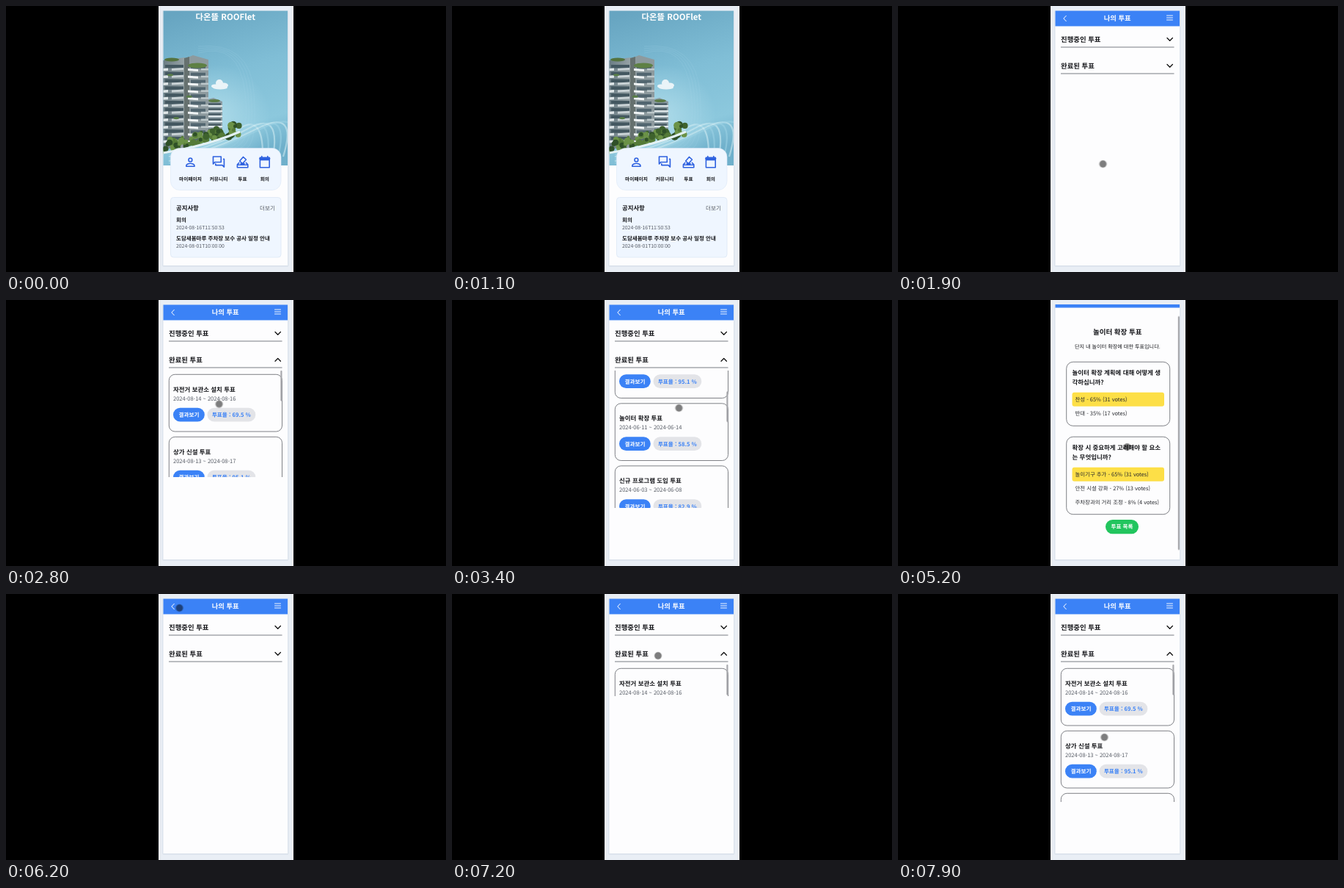
These frames come from a looping animation (600 by 362 pixels, 8 s). An HTML page:

```html
<!DOCTYPE html>
<html lang="ko">
<head>
<meta charset="utf-8">
<title>투표 앱</title>
<style>
html, body { margin: 0; width: 100%; height: 100%; overflow: hidden; background: #000; }
svg { display: block; width: 600px; height: 362px; }
text { font-family: "Noto Sans CJK KR", "Noto Sans", sans-serif; text-rendering: geometricPrecision; }
.line { fill: none; stroke-linecap: round; stroke-linejoin: round; }
.box { fill: #fdfdfe; stroke: #5f6168; stroke-width: .8; }
#home, #bar, #votes, #blank, #detail, #pane, #open, #shut, #pull, #cards, #thumb, #page, #pageThumb, #cursor {
  animation: 8s linear infinite;
}
#home { animation-name: home; }
#bar { animation-name: bar; }
#votes { animation-name: votes; }
#detail { animation-name: detail; }
#open { animation-name: open; }
#shut { animation-name: shut; }
#pull { animation-name: pull; transform-origin: 0 94px; }
#cards { animation-name: cards; }
#thumb { animation-name: thumb; }
#page { animation-name: page; }
#pageThumb { animation-name: pageThumb; }
#cursor { animation-name: cursor; }

@keyframes home {
  0%, 21.24% { visibility: visible; }
  21.25%, 100% { visibility: hidden; }
}
@keyframes bar {
  0%, 21.24% { visibility: hidden; }
  21.25%, 100% { visibility: visible; }
}
@keyframes votes {
  0%, 21.24% { opacity: 0; }
  21.25%, 53.74% { opacity: 1; }
  53.75%, 73.74% { opacity: 0; }
  73.75%, 100% { opacity: 1; }
}
@keyframes detail {
  0%, 56.87% { opacity: 0; }
  56.88%, 73.74% { opacity: 1; }
  73.75%, 100% { opacity: 0; }
}
@keyframes open {
  0%, 32.49% { opacity: 0; }
  32.5%, 60% { opacity: 1; }
  60.01%, 88.74% { opacity: 0; }
  88.75%, 100% { opacity: 1; }
}
@keyframes shut {
  0%, 32.49% { opacity: 1; }
  32.5%, 60% { opacity: 0; }
  60.01%, 88.74% { opacity: 1; }
  88.75%, 100% { opacity: 0; }
}
@keyframes pull {
  0%, 32.5% { transform: scaleY(0); animation-timing-function: ease-in-out; }
  36.25%, 60% { transform: scaleY(1); }
  60.01%, 88.75% { transform: scaleY(0); animation-timing-function: ease-in-out; }
  92.5%, 100% { transform: scaleY(1); }
}
@keyframes cards {
  0%, 37.5% { transform: none; animation-timing-function: ease-out; }
  42%, 60% { transform: translateY(-130.5px); }
  60.01%, 100% { transform: none; }
}
@keyframes thumb {
  0%, 37.5% { transform: none; animation-timing-function: ease-out; }
  42%, 60% { transform: translateY(28.5px); }
  60.01%, 100% { transform: none; }
}
@keyframes page {
  0%, 59% { transform: none; animation-timing-function: ease-out; }
  64%, 68.5% { transform: translateY(-17px); }
  70.5%, 100% { transform: none; }
}
@keyframes pageThumb {
  0%, 59% { transform: none; animation-timing-function: ease-out; }
  64%, 68.5% { transform: translateY(15.6px); }
  70.5%, 100% { transform: none; }
}
@keyframes cursor {
  0%, 16.24% { transform: translate(322px, 214px); opacity: 0; }
  16.25%, 21.25% { transform: translate(322px, 214px); opacity: 1; }
  23.75% { transform: translate(279.5px, 215px); }
  26% { transform: translate(279.5px, 212px); }
  31.25%, 33.75% { transform: translate(281px, 84px); }
  37.5% { transform: translate(309.5px, 255px); animation-timing-function: ease-out; }
  42%, 43.5% { transform: translate(309.5px, 147px); }
  47.5%, 55% { transform: translate(249px, 195px); }
  59% { transform: translate(312.5px, 217px); animation-timing-function: ease-out; }
  64%, 68.5% { transform: translate(312.5px, 200px); }
  72.5%, 74% { transform: translate(228px, 17px); }
  77%, 79% { transform: translate(236.5px, 19px); }
  87%, 90.5% { transform: translate(281px, 84px); }
  98%, 99.99% { transform: translate(281.5px, 195px); opacity: 1; }
  100% { transform: translate(281.5px, 195px); opacity: 0; }
}
</style>
</head>
<body>
<svg viewBox="0 0 600 362" xmlns="http://www.w3.org/2000/svg">
  <defs>
    <linearGradient id="sky" x1=".2" y1="0" x2=".45" y2="1">
      <stop offset="0" stop-color="#67a5c1"/>
      <stop offset=".45" stop-color="#80bed6"/>
      <stop offset=".8" stop-color="#8cc8dd"/>
      <stop offset="1" stop-color="#6fb0cb"/>
    </linearGradient>
    <radialGradient id="glow">
      <stop offset="0" stop-color="#b9e2ee" stop-opacity=".75"/>
      <stop offset="1" stop-color="#b9e2ee" stop-opacity="0"/>
    </radialGradient>
    <linearGradient id="wall">
      <stop offset="0" stop-color="#697b83"/>
      <stop offset="1" stop-color="#98a4a7"/>
    </linearGradient>
    <clipPath id="screen"><rect x="214.5" y="6.5" width="169.5" height="346.5"/></clipPath>
    <clipPath id="photoClip"><rect x="214.5" y="6.5" width="169.5" height="210.5"/></clipPath>
    <clipPath id="pullClip"><rect id="pull" x="221" y="94" width="157" height="189"/></clipPath>
    <clipPath id="listClip"><rect x="221" y="96" width="157" height="187"/></clipPath>
  </defs>

  <rect width="600" height="362"/>
  <rect x="208" width="184" height="362" fill="#e9eef5"/>
  <rect x="213" y="6" width="172.5" height="349" rx="2" fill="#dde4ed"/>
  <rect x="214.5" y="6.5" width="169.5" height="346.5" fill="#fdfdfe"/>

  <g clip-path="url(#screen)">
    <g id="home">
      <g id="photo" clip-path="url(#photoClip)"></g>
      <rect x="224.5" y="193.5" width="150.5" height="57" rx="12" fill="#eff6ff" stroke="#dce8f7" stroke-width=".6"/>
      <rect x="224.5" y="260.5" width="150.5" height="81.5" rx="4" fill="#eff6ff" stroke="#dce8f5" stroke-width=".8"/>
      <g class="line" stroke="#2f62e0" stroke-width="2">
        <g transform="translate(241.8 203) scale(.8)">
          <circle cx="12" cy="8" r="3"/>
          <path d="M5 19v-1c0-2.6 4.5-4 7-4s7 1.4 7 4v1z"/>
        </g>
        <g transform="translate(280 202.5) scale(.83)">
          <path d="M3 3h13v9H6l-3 3zM20 7h1v13l-3-3H7v-2"/>
        </g>
        <g transform="translate(313 203) scale(.8)">
          <path d="M6 13l-3 3v5h18v-5l-3-3M3 16.5h18M7 10l6-7 5 4.500-6 7zM9 14.500h6"/>
        </g>
        <g transform="translate(343.2 203) scale(.8)">
          <path d="M4 4h16v17H4zM4 8h16M7 2v2M17 2v2"/>
          <path d="M4 6h16" stroke-width="3"/>
        </g>
      </g>
    </g>

    <g id="votes">
      <path d="M222 56H376.500M222 92H376.500" stroke="#6a6e78" stroke-width=".9"/>
      <g class="line" stroke="#111" stroke-width="1.300">
        <path d="M367 43.500l3.700 3.700 3.700-3.700"/>
        <path id="shut" d="M367 79.500l3.700 3.700 3.700-3.700"/>
        <path id="open" d="M367 83.200l3.700-3.700 3.700 3.700"/>
      </g>
      <g clip-path="url(#pullClip)">
        <g clip-path="url(#listClip)">
          <g id="cards"></g>
          <rect id="thumb" x="374.300" y="96" width="2.200" height="41.500" rx="1" fill="#a8a9ad"/>
        </g>
      </g>
    </g>

    <g id="page">
      <g id="bar">
        <rect x="214.500" y="6.500" width="169.500" height="21" fill="#3b82f6"/>
        <g class="line" stroke="#fff" stroke-width="1">
          <path d="M229.300 13.300l-3.500 3.700 3.500 3.700"/>
          <path d="M366.500 13h8M366.500 16h8M366.500 19h8" stroke-width=".9"/>
        </g>
      </g>
      <g id="detail"></g>
    </g>
    <g id="pageThumbWrap"></g>
  </g>

  <g id="cursor">
    <circle r="5.600" opacity=".15"/>
    <circle r="4.700" opacity=".42"/>
  </g>
</svg>

<script>
const $ = id => document.getElementById(id);

function add(parent, tag, attrs, content) {
  const el = document.createElementNS("http://www.w3.org/2000/svg", tag);
  for (const key in attrs) el.setAttribute(key, attrs[key]);
  if (content) el.textContent = content;
  parent.appendChild(el);
  return el;
}

// cy is the visual middle of the line of text.
function label(parent, content, x, cy, size, { weight = 700, fill = "#15161a", anchor = "start" } = {}) {
  return add(parent, "text", {
    x, y: cy + size * .37, "font-size": size, "font-weight": weight, fill, "text-anchor": anchor
  }, content);
}

const rect = (parent, x, y, width, height, fill, rx = 0) =>
  add(parent, "rect", { x, y, width, height, fill, rx });
const poly = (parent, points, fill) => add(parent, "polygon", { points, fill });

function drawPhoto() {
  const p = $("photo");
  let seed = 7;
  const rand = () => (seed = seed * 16807 % 2147483647) / 2147483647;

  rect(p, 214, 6, 171, 212, "url(#sky)");
  add(p, "ellipse", { cx: 285, cy: 150, rx: 75, ry: 70, fill: "url(#glow)" });
  for (let i = 0; i < 4; i++) {
    add(p, "path", {
      d: `M262 ${64 - i * 3}Q${318 + i * 5} 48 ${326 + i * 4} 118T${300 + i * 9} 194`,
      fill: "none", stroke: "#a9d8e8", "stroke-width": .5, opacity: .4
    });
  }
  for (let i = 0; i < 6; i++) {
    add(p, "path", {
      d: `M222 ${199 + i * 3}Q285 ${188 + i * 2} ${318 + i * 6} 167T${350 + i * 7} 205`,
      fill: "none", stroke: i % 2 ? "#9fd3e5" : "#d5eef5", "stroke-width": 2.2, opacity: .55
    });
  }
  [[285, 109, 5, 2.5], [291, 105, 5, 5], [297, 108, 6, 3.5], [292, 111, 10, 2.5]].forEach(
    ([cx, cy, rx, ry]) => add(p, "ellipse", { cx, cy, rx, ry, fill: "#eaf4f8" }));

  // far block
  poly(p, "271,128 283,125 295,130 295,173 271,178", "#8b9ca3");
  for (let y = 132; y < 172; y += 7) {
    rect(p, 273, y, 20, 3, "#50636b");
    rect(p, 276, y + 3, 19, 2.2, "#e2eaec");
  }
  // near block
  poly(p, "214,74 244,70 244,194 214,194", "url(#wall)");
  poly(p, "243,72 255,67 276,73 276,181 243,188", "#8d9a9e");
  poly(p, "243,71 250,69 250,186 243,188", "#66716f");
  for (let i = 0; i < 11; i++) {
    const y = 80 + i * 9.8;
    rect(p, 217, y, 25, 4.5, "#435760");
    rect(p, 252, y + 1, 20, 4.5, "#526670");
    poly(p, `214,${y + 5} 221,${y + 4.5} 221,${y + 8} 214,${y + 8.5}`, "#dfe6e8");
    poly(p, `226,${y + 5} 242,${y + 4} 242,${y + 7} 226,${y + 8}`, "#c9d2d5");
    poly(p, `248,${y + 5} 262,${y + 6} 262,${y + 9} 248,${y + 8}`, "#f0f4f5");
    rect(p, 266, y + 5, 10, 2.5, "#bdc8cb");
    if (i % 3 == 1) add(p, "ellipse", { cx: 224 + rand() * 28, cy: y + 4, rx: 4, ry: 1.6, fill: "#587d46" });
  }
  add(p, "ellipse", { cx: 226, cy: 73, rx: 10, ry: 2.5, fill: "#54733f" });
  add(p, "ellipse", { cx: 261, cy: 81, rx: 13, ry: 3.5, fill: "#5e8044" });
  add(p, "ellipse", { cx: 284, cy: 129, rx: 8, ry: 2, fill: "#5b7b45" });

  const greens = ["#3e622d", "#557b38", "#6b9247", "#2f5028"];
  for (let i = 0; i < 80; i++) {
    const k = rand();
    add(p, "circle", {
      cx: 215 + k * 103, cy: 191 - k * 24 + (rand() - .5) * 15,
      r: 2 + rand() * 3.2, fill: greens[i % 4]
    });
  }
  add(p, "path", { d: "M214 200Q275 190 319 171", fill: "none", stroke: "#e3f1f4", "stroke-width": 3 });
}

function drawHome() {
  const home = $("home"), mid = { anchor: "middle" };
  label(home, "다온뜰 ROOFlet", 299.3, 14.5, 11.4, { fill: "#fff", ...mid });
  [["마이페이지", 251.5], ["커뮤니티", 290], ["투표", 322.5], ["회의", 352.8]].forEach(
    ([name, x]) => label(home, name, x, 235.5, 6.7, mid));
  label(home, "공지사항", 232, 275, 8.4);
  label(home, "더보기", 367, 275, 7.6, { weight: 400, fill: "#555a63", anchor: "end" });
  [["회의", "2024-08-16T11:50:53"], ["도담새봄마루 주차장 보수 공사 일정 안내", "2024-08-01T10:00:00"]].forEach(
    ([title, date], i) => {
      label(home, title, 232, 291.5 + i * 24.3, 7.5);
      label(home, date, 232, 301.7 + i * 24.3, 6.85, { weight: 400, fill: "#555a63" });
    });
}

function drawVotes() {
  label($("votes"), "진행중인 투표", 222, 45.5, 9.4);
  label($("votes"), "완료된 투표", 222, 81.5, 9.4);
  label($("bar"), "나의 투표", 299.2, 17, 9.35, { fill: "#fff", anchor: "middle" });
  [
    ["자전거 보관소 설치 투표", "2024-08-14 ~ 2024-08-16", "69.5"],
    ["상가 신설 투표", "2024-08-13 ~ 2024-08-17", "95.1"],
    ["놀이터 확장 투표", "2024-06-11 ~ 2024-06-14", "58.5"],
    ["신규 프로그램 도입 투표", "2024-06-03 ~ 2024-06-08", "82.9"]
  ].forEach(([title, dates, rate], i) => {
    const card = add($("cards"), "g", { transform: `translate(0 ${101.3 + i * 85})` });
    add(card, "rect", { class: "box", x: 222.3, y: 0, width: 154.2, height: 77.7, rx: 8 });
    label(card, title, 228, 20.3, 8.45);
    label(card, dates, 228, 32.5, 7.5, { weight: 400, fill: "#555a63" });
    rect(card, 228, 45.5, 42.8, 18.8, "#3b82f6", 9.4);
    label(card, "결과보기", 249.4, 55, 7.6, { fill: "#fff", anchor: "middle" });
    rect(card, 274.5, 45.5, 65.8, 18.8, "#e3e4e8", 9.4);
    label(card, `투표율 : ${rate} %`, 307.4, 55, 7.6, { fill: "#3b82f6", anchor: "middle" });
  });
}

function question(parent, y, height, lines, answers) {
  add(parent, "rect", { class: "box", x: 229.7, y, width: 141, height, rx: 9 });
  lines.forEach((line, i) => label(parent, line, 237.5, y + 14.5 + i * 13.2, 8.45));
  rect(parent, 237.5, y + 41.5, 125.5, 19, "#fddf47", 3);
  answers.forEach((answer, i) =>
    label(parent, answer, 241.5, y + 51.2 + i * 18.8, 7.4, { weight: 400, fill: "#25272c" }));
}

function drawDetail() {
  const d = $("detail"), mid = { anchor: "middle" };
  label(d, "놀이터 확장 투표", 299.2, 60.8, 9.5, mid);
  label(d, "단지 내 놀이터 확장에 대한 투표입니다.", 299.3, 80.8, 7.13, { weight: 400, ...mid });
  question(d, 101.3, 87, ["놀이터 확장 계획에 대해 어떻게 생", "각하십니까?"],
    ["찬성 - 65% (31 votes)", "반대 - 35% (17 votes)"]);
  question(d, 203.2, 105.5, ["확장 시 중요하게 고려해야 할 요소", "는 무엇입니까?"],
    ["놀이기구 추가 - 65% (31 votes)", "안전 시설 강화 - 27% (13 votes)", "주차장과의 거리 조정 - 8% (4 votes)"]);
  rect(d, 283, 316, 45, 19.3, "#22c55e", 9.6);
  label(d, "투표 목록", 305.5, 325.7, 7.55, { fill: "#fff", ...mid });

  // The scrollbar stays outside the scrolled page.
  const wrap = $("pageThumbWrap");
  wrap.style.animation = "detail 8s linear infinite";
  const thumb = rect(wrap, 381.8, 6.5, 2.2, 318, "#a8a9ad", 1);
  thumb.id = "pageThumb";
}

drawPhoto();
drawHome();
drawVotes();
drawDetail();
</script>
</body>
</html>
```
